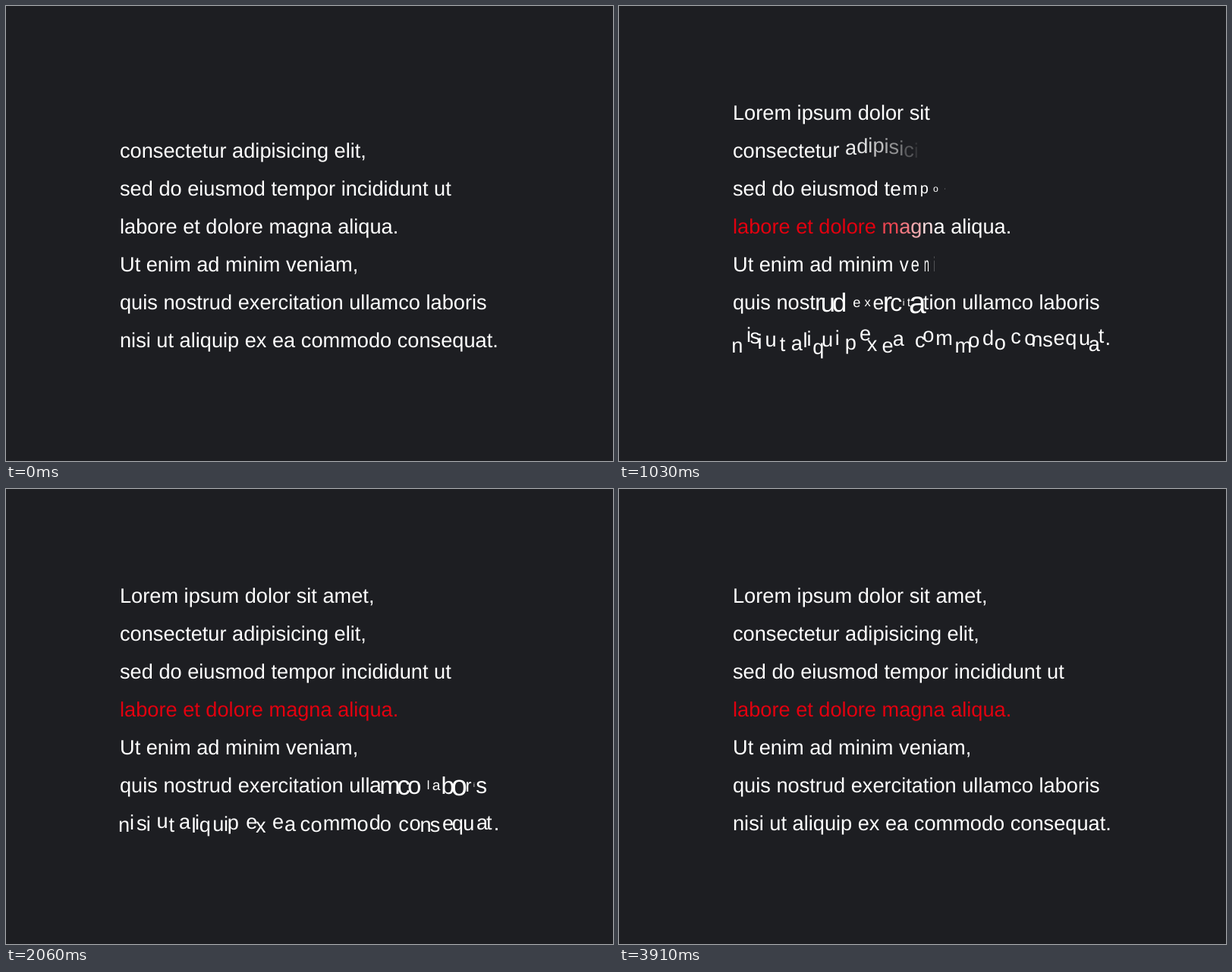
An HTML page with a canvas that plays this animation: 800 px wide and 600 px high, repeating every 3.94 s.

```html
<!DOCTYPE html>
<html lang="la">
<head>
<meta charset="utf-8">
<title>Letter effects</title>
<style>
  html, body { margin: 0; width: 100%; height: 100%; overflow: hidden; background: #1d1e22; }
  canvas { display: block; }
</style>
</head>
<body>
<canvas id="stage" width="800" height="600"></canvas>
<script>
const LOOP = 3940, START = 30, DELAY = 50;
const LEFT = 150, TOP = 150, LEADING = 50, SIZE = 27.2;
const MIDDLE = SIZE * 0.3465; // from the baseline up to the centre of a letter box
const WHITE = [255, 255, 255], RED = [226, 0, 15];

const ctx = document.getElementById('stage').getContext('2d');
ctx.font = `${SIZE}px "Liberation Sans", Arial, sans-serif`;
ctx.fontKerning = 'none';
ctx.textRendering = 'geometricPrecision';
ctx.textAlign = 'center';

const clamp = v => Math.min(1, Math.max(0, v));
const mix = (a, b, p) => a + (b - a) * p;
const swing = p => (1 - Math.cos(Math.PI * p)) / 2;

// The CSS "ease" curve, cubic-bezier(.25, .1, .25, 1)
function ease(x) {
  const bezier = (a, b, u) => 3 * a * u * (1 - u) ** 2 + 3 * b * u * u * (1 - u) + u ** 3;
  let low = 0, high = 1;
  for (let n = 0; n < 14; n++) {
    const u = (low + high) / 2;
    if (bezier(0.25, 0.25, u) < x) low = u; else high = u;
  }
  return bezier(0.1, 1, low);
}

function random(seed) {
  let n = Math.imul(seed ^ (seed >>> 15), 0x2c1b3c6d);
  n = Math.imul(n ^ (n >>> 12), 0x297a2d39);
  return ((n ^ (n >>> 15)) >>> 0) / 2 ** 32;
}

// Bell-shaped noise with unit deviation
const noise = seed => 2 * (random(seed) + random(seed + 7919) + random(seed + 15838) - 1.5);

const BOUNCE = [[18, 1], [32, 1.5], [105, 0.3], [213, 1.4], [345, 0.58], [500, 1.3], [650, 1]];

function bounce(age) {
  const k = BOUNCE.findIndex(([time]) => age < time);
  if (k < 1) return 1;
  const [t0, s0] = BOUNCE[k - 1], [t1, s1] = BOUNCE[k];
  return mix(s0, s1, swing((age - t0) / (t1 - t0)));
}

// Each effect gives a letter's pose from its own age, its index and the time
const grow = age => ease(clamp(age / 300));

const type = age => ({ alpha: age >= 25 ? 1 : 0 });

function wave(age) {
  const p = clamp(age / 600);
  return { alpha: 1 - (1 - p) ** 2, y: -7 * Math.sin(Math.PI * p) ** 2 };
}

function zoom(age) {
  const s = grow(age);
  return { sx: s, sy: s };
}

function tint(age) {
  const p = clamp(age / 250);
  return { color: WHITE.map((c, n) => Math.round(mix(c, RED[n], p))) };
}

const unfold = age => ({ sx: grow(age) });

function pulse(age) {
  const s = bounce(age);
  return { sx: s, sy: s };
}

function shake(age, i, t) {
  const power = 9 * clamp(1 - t / 3700) ** 2;
  const seed = Math.floor(t * 0.03) * 977 + i * 131071 + 5;
  return { x: 0.6 * power * noise(seed), y: power * noise(seed + 499979) };
}

const lines = [
  ['Lorem ipsum dolor sit amet,', type],
  ['consectetur adipisicing elit,', wave],
  ['sed do eiusmod tempor incididunt ut', zoom],
  ['labore et dolore magna aliqua.', tint],
  ['Ut enim ad minim veniam,', unfold],
  ['quis nostrud exercitation ullamco laboris', pulse],
  ['nisi ut aliquip ex ea commodo consequat.', shake]
].map(([text, effect], row) => {
  let x = LEFT;
  const letters = [...text].map(char => {
    const width = ctx.measureText(char).width;
    x += width;
    return { char, x: x - width / 2 };
  });
  return { letters, effect, y: TOP + row * LEADING - MIDDLE };
});

function drawLetter(char, cx, cy, { x = 0, y = 0, sx = 1, sy = 1, alpha = 1, color = WHITE }) {
  if (alpha <= 0 || sx <= 0) return;
  ctx.setTransform(sx, 0, 0, sy, cx + x, cy + y);
  ctx.globalAlpha = alpha;
  ctx.fillStyle = `rgb(${color})`;
  ctx.fillText(char, 0, MIDDLE);
}

function draw(t) {
  ctx.setTransform(1, 0, 0, 1, 0, 0);
  ctx.globalAlpha = 1;
  ctx.fillStyle = '#1d1e22';
  ctx.fillRect(0, 0, 800, 600);
  for (const { letters, effect, y } of lines) {
    letters.forEach(({ char, x }, i) => {
      // Before the effects begin, only the typed line is hidden
      const resting = t < START && effect !== type;
      drawLetter(char, x, y, resting ? {} : effect(t - i * DELAY, i, t));
    });
  }
}

const begin = performance.now();
function frame() {
  draw((performance.now() - begin) % LOOP);
  requestAnimationFrame(frame);
}
frame();
</script>
</body>
</html>
```
